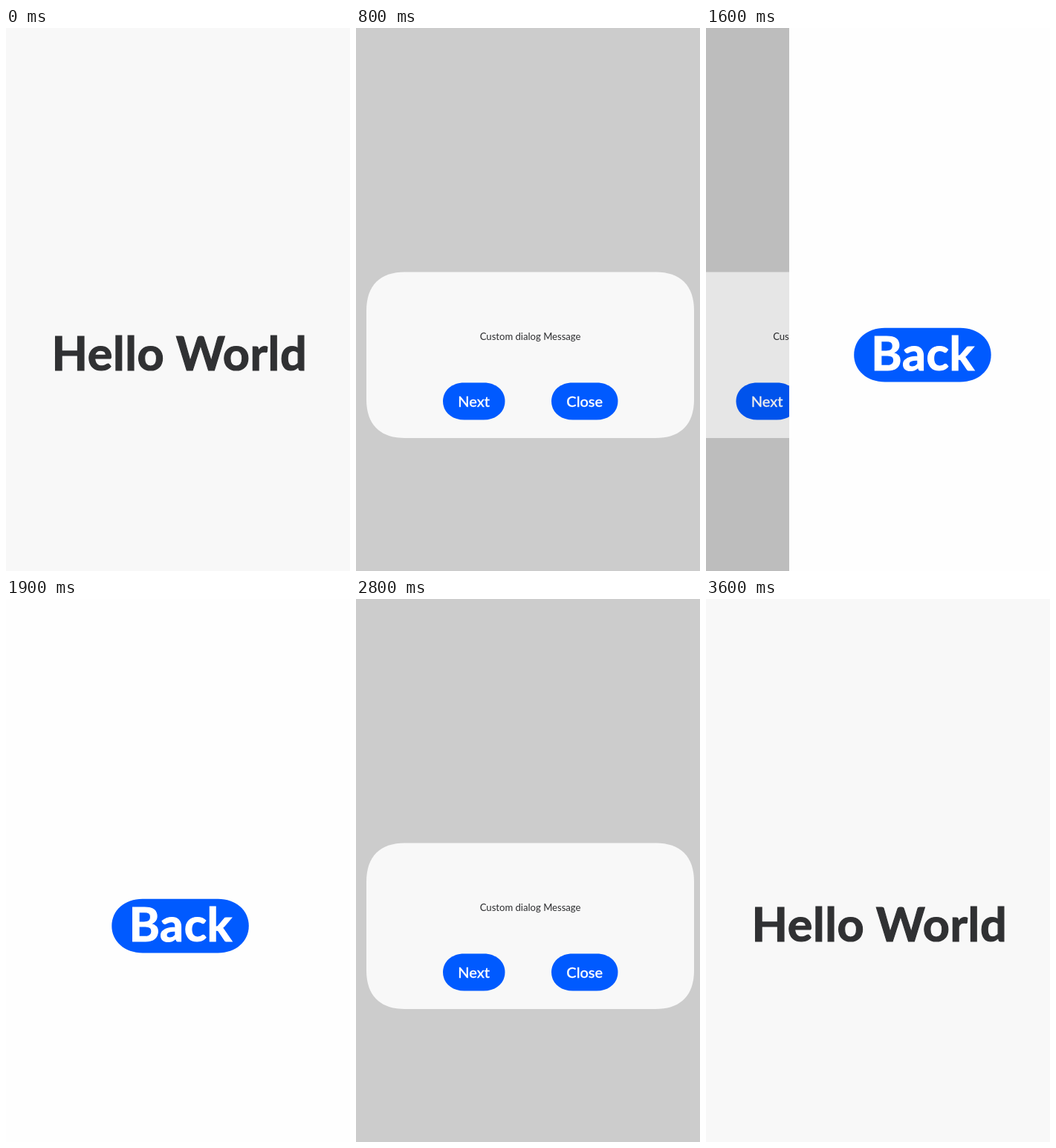
These frames come from a looping animation (463x731 px, 3.7 s). An HTML page:

```html
<!DOCTYPE html>
<html lang="en">
<head>
<meta charset="utf-8">
<title>Dialog and page navigation</title>
<style>
  html, body { margin: 0; width: 100%; height: 100%; overflow: hidden; background: #f8f8f8; }
  svg { display: block; width: 100%; height: 100%; }
  text { font-family: Lato, "Open Sans", sans-serif; text-anchor: middle; }
  .title { font-size: 63px; font-weight: 700; letter-spacing: 0.6px; stroke-width: 1.2; }
  .label { font-size: 20px; font-weight: 500; stroke-width: 0.3; }
  .note { font-size: 13.1px; fill: #2c2d2f; }
  .dark { fill: #303133; stroke: #303133; }
  .light { fill: #fff; stroke: #fff; }
  .pill { fill: #005aff; }
</style>
</head>
<body>
<svg viewBox="0 0 463 731">
  <defs>
    <clipPath id="reveal"><rect id="window" width="463" height="731"/></clipPath>
  </defs>
  <rect width="463" height="731" fill="#f8f8f8"/>
  <text class="title dark" x="233.4" y="461.2">Hello World</text>
  <rect id="mask" width="463" height="731"/>
  <g id="dialog">
    <path id="panel" fill="#f8f8f8"/>
    <text class="note" x="234.6" y="420">Custom dialog Message</text>
    <path id="next" class="pill"/>
    <text class="label light" x="158.7" y="509.7">Next</text>
    <path id="close" class="pill"/>
    <text class="label light" x="307.7" y="509.7">Close</text>
  </g>
  <rect id="dim" width="463" height="731"/>
  <g id="page" clip-path="url(#reveal)">
    <rect width="463" height="731" fill="#fefefe"/>
    <g id="content">
      <path id="back" class="pill"/>
      <text class="title light" x="235.2" y="461.2">Back</text>
    </g>
  </g>
</svg>
<script>
const W = 463, LOOP = 3700, STEP = 100;
const CX = 234.6, CY = 440.3;
const $ = id => document.getElementById(id);
const set = (id, name, value) => $(id).setAttribute(name, value);

// Rounded box with continuous corners; k pulls the curve towards the corner.
function smoothBox(x, y, w, h, rx, ry, k) {
  const r = x + w, b = y + h, cx = rx * (1 - k), cy = ry * (1 - k);
  return `M${x} ${y + ry}C${x} ${y + cy} ${x + cx} ${y} ${x + rx} ${y}` +
    `H${r - rx}C${r - cx} ${y} ${r} ${y + cy} ${r} ${y + ry}` +
    `V${b - ry}C${r} ${b - cy} ${r - cx} ${b} ${r - rx} ${b}` +
    `H${x + rx}C${x + cx} ${b} ${x} ${b - cy} ${x} ${b - ry}Z`;
}
const pill = (x, y, w, h) => smoothBox(x, y, w, h, h * 0.57, h / 2, 0.58);

set("panel", "d", smoothBox(14, 328.5, 441, 223.5, 52, 52, 0.65));
set("next", "d", pill(117, 477.5, 83.5, 50));
set("close", "d", pill(263, 477.5, 89.5, 50));
set("back", "d", pill(142.3, 403.7, 184.5, 72.8));

// Critically damped spring, time in ms.
function spring(ms) {
  if (ms <= 0) return 0;
  const x = 0.0185 * ms;
  return x > 7.5 ? 1 : 1 - (1 + x) * Math.exp(-x);
}

// Dialog state: panel opacity, mask strength, scale.
function dialogAt(t) {
  if (t < 400 || t >= 3600) return [0, 0, 1];
  if (t < 500) return [0.45, 0.45, 0.93];
  if (t < 600) return [0.95, 0.92, 0.99];
  if (t < 3400) return [1, 1, 1];
  if (t < 3500) return [0.865, 0.82, 0.941];
  return [0.3, 0.3, 0.875];
}

function draw(time) {
  const t = Math.floor(time % LOOP / STEP) * STEP;
  const push = t < 2400 ? spring(t - 1452) : 1 - spring(t - 2381);
  const edge = W * (1 - push);
  const [alpha, mask, scale] = dialogAt(t);
  const shift = -0.218 * W * push;

  set("mask", "fill-opacity", 0.177 * mask);
  set("dialog", "opacity", alpha);
  set("dialog", "transform",
    `translate(${CX + shift} ${CY}) scale(${scale}) translate(${-CX} ${-CY})`);
  set("dim", "fill-opacity", 0.1 * push);
  set("window", "x", edge);
  set("content", "transform", `translate(${0.508 * edge} 0)`);
  set("page", "visibility", push > 0 ? "visible" : "hidden");
}

const start = performance.now();
function tick() {
  draw(performance.now() - start);
  requestAnimationFrame(tick);
}
tick();
</script>
</body>
</html>
```
